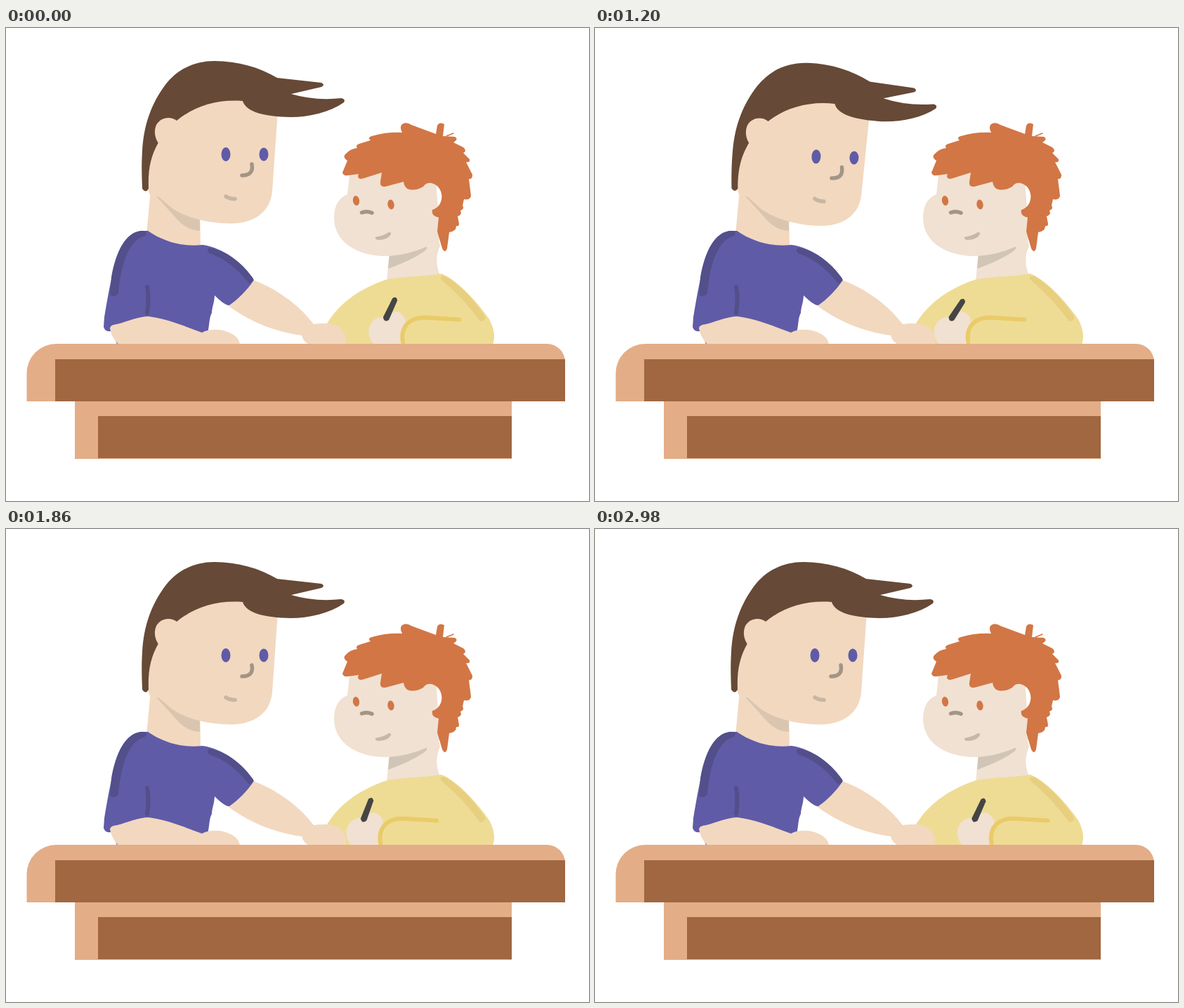
An HTML page that plays this animation: 830x674 px, repeating every 3 s.

```html
<!DOCTYPE html>
<html lang="en">
<head>
<meta charset="utf-8">
<title>Homework at the desk</title>
<style>
  html, body { margin: 0; width: 100%; height: 100%; overflow: hidden; background: #fff; }
  svg { display: block; width: 830px; height: 674px; }
  .line { fill: none; stroke-linecap: round; stroke-linejoin: round; }
  .skin { fill: #f2d8bf; }
  .pale { fill: #f0e1d2; }
  .shirt { fill: #605ba6; }
  .shade { stroke: #524f8b; }
  .ginger { fill: #d27645; }
  .yellow { fill: #eedc94; }
  .light { fill: #e3ad87; }
  .wood { fill: #a06741; }
</style>
</head>
<body>
<svg viewBox="0 0 830 674">
  <!-- child: body and head -->
  <path class="pale" d="M546 315L542 362H620L617 350C611 335 613 322 618 310L612 285Z"/>
  <path fill="#d1c5b7" d="M546 322C565 322 585 318 598 311Q601 313 597 317C583 327 566 335 544 343Z"/>
  <path class="pale" d="M490 200L486 237C473 242 467 255 467 270C467 305 500 325 540 325C561 325 585 318 600 311L618 300L612 215Z"/>
  <path class="ginger" d="M479 206L486 189Q479 184 483 180Q490 172 500 171Q497 167 503 165L519 160Q514 156 521 154Q541 148 564 149Q559 139 566 136Q571 134 577 138L612 151L614 139Q617 133 624 137L622 154L639 155Q645 158 637 163L651 170Q657 175 651 178L660 187Q661 192 655 191L664 209Q664 216 659 215L662 239Q661 246 652 244L650 253Q653 258 647 260L648 264Q646 268 643 268L645 279Q645 283 641 282Q641 290 631 291L628 314Q625 322 621 314L614 290L616 270Q605 268 607 259C625 254 625 226 606 221Q598 220 594 226Q584 232 574 230Q567 228 566 219L540 226Q532 227 533 219L535 206L506 215Q499 215 502 208L487 210Q480 211 479 206Z"/>
  <path class="line" stroke="#d27645" stroke-width="1.5" d="M627 154L637 150"/>
  <g class="ginger">
    <ellipse cx="498.5" cy="246" rx="4.6" ry="7" transform="rotate(-8 498.5 246)"/>
    <ellipse cx="548" cy="251.5" rx="4.6" ry="7" transform="rotate(-8 548 251.5)"/>
  </g>
  <path class="line" stroke="#a29586" stroke-width="5.5" d="M506.500 263Q514 260.500 521 263.500"/>
  <path fill="#c8b7a5" d="M526 298Q538 296 545 291Q549 291 548 294Q543 302 530 302Q525 301 526 298Z"/>
  <path class="yellow" d="M445 451C450 425 475 380 543 358C565 354 595 354 620 350C645 361 672 392 688 415C695 428 697 440 693 451Z"/>
  <path fill="#e8cf80" d="M619 354Q624 351 630 356Q660 377 682 411Q683 418 675 418Q653 387 619 358Z"/>

  <!-- adult: body -->
  <path class="skin" d="M206 230L200 294L240 325L277 312L276 255Z"/>
  <path fill="#dac6b0" d="M214 237C233 256 255 266 276 270V289C265 289 254 284 244 273C235 263 224 251 215 241Z"/>
  <path class="skin" d="M349 358C383 370 416 393 438 422C452 420 468 421 476 427Q485 434 484 451H432Q423 447 421 438C381 433 343 416 314 394Z"/>
  <path class="shirt" d="M140 412C144 388 148 365 153 345C160 315 172 289 195 289H202C225 305 252 312 280 309C311 314 336 334 353 359C343 374 331 386 318 395Q312 396 297 381C296 395 294 394 293 406C289 413 290 422 287 435L270 440L158 451L157 448L152 431Q142 435 139 426Z"/>
  <path fill="#524f8b" d="M148 381L150 355C156 320 170 289 195 289Q203 290 198 296C172 303 163 343 160 378Q156 384 148 381Z"/>
  <path fill="#524f8b" d="M287 318Q286 312 294 314C318 320 338 337 352 357Q353 362 346 364C329 342 309 327 289 321Z"/>
  <path class="line shade" stroke-width="6" d="M201 369Q204 385 201 406"/>
  <path class="skin" d="M148 428Q148 423 158 422C174 418 188 411 203 411C228 414 255 425 279 434C290 428 307 429 318 434Q332 440 333 451H160Q150 440 148 428Z"/>

  <!-- adult: head -->
  <g id="head">
    <path class="skin" d="M203 232C201 205 205 180 217 162L240 110L337 95L387 118L379 233C376 264 351 279 318 278.500C285 278 250 269 232 253L217 240Q204 242 203 232Z"/>
    <path fill="#664936" d="M194 229C193 205 193 190 194 175C196 138 207 108 226 82C245 57 270 47 297 47C330 47 361 56 386 71L449 78Q455 81 449 84L406 94Q440 104 477 100Q484 101 481 106C461 120 432 127 405 127C368 126 342 120 337 104C300 101 267 112 243 132L217 163C206 183 202 201 203 229Q199 236 194 229Z"/>
    <path class="skin" d="M243 132C234 125 220 127 214 138C210 147 212 157 217 164L245 165Z"/>
    <g class="shirt">
      <ellipse cx="313" cy="180" rx="6.500" ry="10"/>
      <ellipse cx="367" cy="180" rx="6.500" ry="9.500"/>
    </g>
    <path class="line" stroke="#a29586" stroke-width="5.500" d="M350 194Q353 210 336 210"/>
    <path class="line" stroke="#c8b6a3" stroke-width="5.500" d="M313 240Q318 243.500 326 243.500"/>
  </g>

  <!-- writing hand -->
  <g id="hand">
    <path class="pale" d="M524 451C513 440 513 421 529 413Q536 410 542 413Q547 404 556 404Q568 407 569 419L570 451Z"/>
    <path class="yellow" d="M567 451C562 425 576 413 595 413L647 416V451Z"/>
    <path class="line" stroke="#eacb69" stroke-width="6" d="M565 448C561 424 576 412.500 596 412.500L645 415.500"/>
    <path id="pen" fill="#454545" d="M-4.500 0L-3.800 -30Q0 -36 3.800 -30L4.500 0Q0 7 -4.500 0Z"/>
  </g>

  <!-- desk -->
  <path class="light" d="M29.500 532V492A42 42 0 0 1 71.500 450H770A26 26 0 0 1 796 476V532Z"/>
  <path class="wood" d="M70 472H796V532H70Z"/>
  <path class="light" d="M98 532H720V614H98Z"/>
  <path class="wood" d="M131 553H720V613H131Z"/>
</svg>
<script>
  const LOOP = 3000;
  const [head, hand, pen] = ['head', 'hand', 'pen'].map(id => document.getElementById(id));

  // Each key is [time in ms, angle in degrees].
  const penKeys = [[0, 25], [480, -29], [1200, 33], [1500, -20], [1800, 25],
                   [2100, -20], [2400, 25], [2700, -20], [3000, 25]];
  const headKeys = [[0, 0], [1000, 0], [1100, -5], [1250, 4], [1500, 0], [3000, 0]];

  function angleAt(keys, t) {
    const i = keys.findIndex(key => key[0] > t);
    const [t0, a] = keys[i - 1], [t1, b] = keys[i];
    return a + (b - a) * (1 - Math.cos(Math.PI * (t - t0) / (t1 - t0))) / 2;
  }

  function draw(now) {
    const t = now % LOOP;
    const slide = 42 * (Math.abs(2 * t / LOOP - 1) - 1);
    hand.setAttribute('transform', `translate(${slide} 0)`);
    pen.setAttribute('transform', `translate(541 414) rotate(${angleAt(penKeys, t)})`);
    head.setAttribute('transform', `rotate(${angleAt(headKeys, t)} 213 241)`);
  }

  const start = performance.now();
  function tick() {
    draw(performance.now() - start);
    requestAnimationFrame(tick);
  }
  tick();
</script>
</body>
</html>
```
